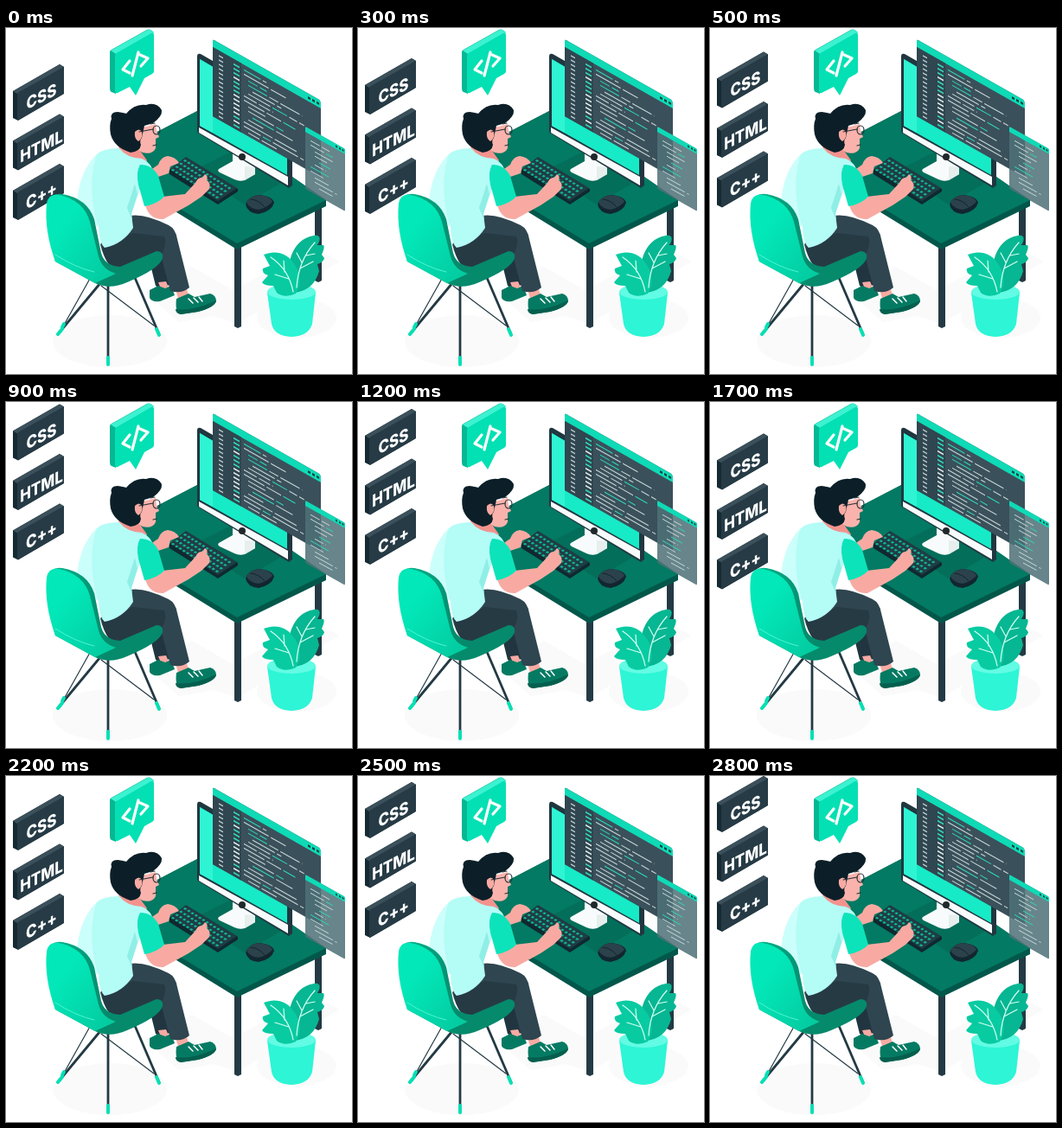
Recreate the animation shown at these times as an HTML page. Size 400 px wide and 400 px high, loop 2.9 s.

```html
<!DOCTYPE html>
<html lang="en">
<head>
<meta charset="utf-8">
<title>Coding at a desk</title>
<style>
html, body { margin: 0; width: 100%; height: 100%; overflow: hidden; background: #fff; }
svg { display: block; width: 100vw; height: 100vh; }
text { font: 800 19.5px Inter, Roboto, sans-serif; fill: #fff; text-anchor: middle; }
.line { fill: none; stroke-linecap: round; stroke-linejoin: round; }
</style>
</head>
<body>
<svg viewBox="0 0 400 400">
  <defs>
    <linearGradient id="shell" x2="1" y2="1">
      <stop offset=".3" stop-color="#02e8b9"/><stop offset="1" stop-color="#04c79d"/>
    </linearGradient>
    <linearGradient id="seat">
      <stop offset="0" stop-color="#06b98f"/><stop offset=".5" stop-color="#058a6c"/>
    </linearGradient>
  </defs>

  <g id="floor" fill="#fafafa">
    <ellipse cx="120" cy="362" rx="66" ry="30"/>
    <ellipse cx="336" cy="335" rx="46" ry="23"/>
    <path d="M160 305L215 276L262 303L357 254L385 270L268 342L240 333L200 340Z"/>
  </g>

  <g id="labels"></g>

  <g id="bubble">
    <path d="M120 28Q120 26 122 25L163 2Q165 1 167 2L171 5L127 31V76L122 74Q120 73 120 70Z" fill="#05b793"/>
    <path d="M121 26L164 2Q166 1 168 3L171 5L127 30Z" fill="#3cf2d0"/>
    <path d="M126 32Q126 30 128 29L168 6Q171 5 171 8V50Q171 52 169 53L160 58L150 78L143 68L129 75Q126 76 126 73Z" fill="#03e0b4"/>
    <path class="line" d="M143 38L135 48L143 52M155 31L164 35L156 44M153 28L146 55" stroke="#fff" stroke-width="3.2"/>
  </g>

  <g id="desk">
    <path d="M357 208h8v84l-4 2l-4-2z" fill="#233a44"/>
    <path d="M264 250h8v95l-4 2l-4-2z" fill="#233a44"/>
    <path d="M150 133L221 96L370 199V206L267 256L150 184Z" fill="#02574a"/>
    <path d="M150 133L221 96L370 199L267 249L150 178Z" fill="#037a63"/>
    <path d="M218 164L262 142L320 178L275 204Z" fill="#036e5a"/>
  </g>

  <g id="monitor">
    <path d="M246 163L262 154V136L288 150V169L276 176Q270 178 264 175L247 167Q244 165 246 163Z" fill="#f8fbfb"/>
    <path d="M276 160L288 161V169L276 176Z" fill="#e6eeee"/>
    <path d="M221 33Q221 29 225 30L331 91V182L327 185L223 122Q221 121 221 118Z" fill="#203740"/>
    <path d="M223 115L326 172V182L223 121Z" fill="#f8fbfb"/>
    <path d="M224 36L325 94V170L224 113Z" fill="#17eac6"/>
    <path d="M224 36L239 45V121L224 113Z" fill="#2ff4d4"/>
    <circle cx="273" cy="149" r="4" fill="#20282c"/>
  </g>

  <g id="keyboard">
    <path d="M189 164L208 150L268 186V189L245 204L189 169Z" fill="#0f2930"/>
    <path d="M190 163L208 149L267 185L245 200Z" fill="#1f3d44"/>
    <g id="keys"></g>
  </g>
  <g id="mouse">
    <path d="M277 204Q279 196 291 193Q308 194 310 202Q307 212 292 215Q279 214 277 204Z" fill="#12262f"/>
    <path d="M278 202Q281 195 291 193Q306 194 308 201Q301 208 292 210Q282 209 278 202Z" fill="#2b414b"/>
    <path class="line" d="M283 198Q293 199 299 207" stroke="#12262f"/>
  </g>

  <g id="editor" transform="matrix(1 .567 0 1 239 13)">
    <path d="M0 2Q0 0 2 0H122Q125 0 125 3V89H0Z" fill="#3a505a"/>
    <path d="M0 2Q0 0 2 0H122Q125 0 125 3V9H0Z" fill="#0fdab6"/>
    <path d="M0 9H33V89H0Z" fill="#304650"/>
    <path d="M110 5h3m2 0h3m2 0h3" stroke="#17453f" stroke-width="2.6"/>
  </g>
  <g id="panel" transform="matrix(1 .56 0 1 346 114)">
    <rect width="46" height="72" rx="1.5" fill="#4f7277" opacity=".86"/>
    <path d="M0 1.5Q0 0 1.5 0H44.500Q46 0 46 1.500V6H0Z" fill="#0fdab6"/>
    <path d="M35 3h2m2 0h2m1.500 0h2" stroke="#17453f" stroke-width="2"/>
  </g>

  <g id="plant">
    <path d="M302 306Q304 297 330 296Q356 297 358 306L354 342Q350 356 330 357Q310 356 307 342Z" fill="#2df5d6"/>
    <ellipse cx="330" cy="305" rx="28" ry="9" fill="#62fbe4"/>
    <path d="M328 300C323 274 330 244 356 240C361 239 364 241 362 247L360 251L367 251Q369 253 365 262L368 266Q367 271 360 273L362 281C358 296 348 305 332 306Z" fill="#07b692"/>
    <path d="M298 262C312 256 325 261 331 270C341 281 342 297 335 307Q322 313 313 306L309 298Q298 298 296 294L303 286Q295 283 297 278L305 275Z" fill="#08cba2"/>
    <path class="line" d="M336 300Q338 269 357 248M342 271L336 260M340 278L355 270M347 263L357 261M332 305Q327 279 306 265M322 282L321 269M327 290L311 285" stroke="#d3fff3" stroke-width="1.2"/>
  </g>

  <g id="person">
    <path d="M163 167L176 158Q179 149 187 148Q196 149 200 156L190 160L188 168L176 172Z" fill="#f8aaa2"/>
    <path d="M164 262L184 256L190 296L180 302L173 298Z" fill="#203540"/>
    <path d="M176 294L185 293L188 300L180 304Z" fill="#f8aaa2"/>
    <path d="M166 303L176 298L184 301L191 298L195 309L178 316Q168 317 166 312Z" fill="#057a62"/>
    <path d="M194 294L207 293L211 310L199 313Z" fill="#f8aaa2"/>
    <path d="M197 313L211 307L218 311L236 307Q243 309 243 316Q240 323 222 328L202 331Q195 329 197 313Z" fill="#057a62"/>
    <path d="M196 325Q215 328 243 315Q242 323 222 328L202 331Q196 330 196 325Z" fill="#045f4e"/>
    <path class="line" d="M211 313l5 5m1-6l5 5m1-6l4 5" stroke="#fff" stroke-width="1.5"/>
    <path d="M109 250L143 217Q160 214 188 228Q196 232 198 244L212 300Q203 308 190 304L179 263L136 284Q116 280 109 250Z" fill="#2f454f"/>
    <path d="M111 252L147 237L183 241Q187 250 179 263L136 284Q115 279 111 252Z" fill="#263a44"/>

    <path d="M130 136L153 139L163 153L153 165L133 155Z" fill="#f3938e"/>
    <path d="M105 146Q112 139 131 139Q139 150 157 151Q169 156 171 169L156 183L145 215L147 231Q135 250 114 254Q108 249 107 230Q95 218 82 205Q84 167 105 146Z" fill="#b4fcf6"/>
    <path d="M105 146Q96 173 101 205Q104 224 107 230Q95 219 82 205Q84 167 105 146Z" fill="#cbfffb"/>
    <path d="M149 180L152 192L145 215L146 222L140 208Z" fill="#8feee6"/>
    <path d="M161 205L181 195L207 192L219 179Q222 172 227 173L230 169Q234 171 232 176Q237 179 235 186L226 195L211 205L182 221Q166 222 161 205Z" fill="#f8aaa2"/>
    <path d="M155 158Q169 158 176 171L183 195Q174 204 160 206L153 181Q150 167 155 158Z" fill="#0de3ba"/>

    <path d="M147 118L173 111L174 119L177 126L173 128L173 139Q169 147 158 144L146 137Z" fill="#fab3ac"/>
    <path d="M122 105Q120 97 129 97Q136 98 139 99Q149 87 162 89Q174 85 180 95Q181 102 170 110L160 113L157 127Q154 130 156 135Q155 143 144 144Q125 138 121 123Q119 112 122 105Z" fill="#0c1f28"/>
    <path d="M149 120Q154 115 157 120Q159 127 153 131Q148 128 149 120Z" fill="#f8aaa2"/>
    <g class="line" stroke="#263238" stroke-width="1.2">
      <ellipse cx="174" cy="118" rx="4" ry="5"/>
      <path d="M154 120L170 117M167 111l5-1M170 136l4-1"/>
    </g>
  </g>

  <g id="chair">
    <g class="line" stroke="#233a44" stroke-width="2.8">
      <path d="M109 295L60 354M118 297L118 388M147 284L177 354"/>
      <path d="M98 288L66 345M110 298L171 344" stroke-width="1.2"/>
    </g>
    <path class="line" d="M65 348L60 354M118 381V389M174 348L177 355M67 342L65 346" stroke="#03e0b4" stroke-width="4"/>
    <path d="M48 203Q51 190 65 192Q94 197 102 221L110 260Q114 275 132 276L174 258Q182 258 181 266Q178 278 140 294Q120 303 103 295L57 270Q46 235 48 203Z" fill="url(#seat)"/>
    <path d="M47 203Q49 191 61 193Q90 199 97 224L107 264Q111 279 127 284L103 295L57 270Q44 234 47 203Z" fill="url(#shell)"/>
    <path class="line" d="M57 262Q80 277 102 282" stroke="#4df5d3" stroke-width="1"/>
  </g>
</svg>
<script>
const LOOP = 2900, STEP = 100;
const NS = 'http://www.w3.org/2000/svg';
// [time, drop below the highest position]
const drift = [[0, 42], [250, 37], [500, 27.5], [700, 14], [900, 2.5], [1000, 1], [1100, 3],
  [1200, 8], [1400, 19], [1700, 36.5], [1800, 39], [1900, 37], [2200, 21], [2500, 7], [2800, 0]];
const find = id => document.getElementById(id);

function add(parent, tag, attrs, label) {
  const node = document.createElementNS(NS, tag);
  for (const key in attrs) node.setAttribute(key, attrs[key]);
  if (label) node.textContent = label;
  return parent.appendChild(node);
}

let seed = 23;
function random() {
  seed = (seed * 16807) % 2147483647;
  return seed / 2147483647;
}

function dash(parent, x, y, width, color, weight) {
  add(parent, 'path', { d: `M${x} ${y}h${width}`, stroke: color, 'stroke-width': weight });
}

function codeLines(parent, x, y, right, bottom, gap, weight) {
  for (let row = 0; y < bottom; y += gap, row++) {
    let at = x + [0, 0, 5, 5, 10, 5][row % 6];
    const end = at + (right - at) * (.2 + .65 * random());
    while (at < end) {
      const width = Math.min(8 + random() * 26, end - at);
      dash(parent, at, y, width, random() < .3 ? '#2fd9bb' : '#c9d8da', weight);
      at += width + 2.5;
    }
  }
}

const editor = find('editor');
for (let y = 15; y < 86; y += 5) {
  dash(editor, 7, y, 5, '#bfd0d2', 1.4);
  dash(editor, 24, y, 7, random() < .4 ? '#35dfbd' : '#e5eeee', 1.6);
}
codeLines(editor, 36, 15, 118, 86, 5, 1.2);
codeLines(find('panel'), 6, 13, 43, 68, 5, 1);

const keys = find('keys');
for (let row = 0; row < 4; row++) {
  for (let col = 0; col < 13; col++) {
    const x = 207 - row * 4.7 + col * 4.25, y = 152 + row * 3.6 + col * 2.62;
    add(keys, 'path', { d: `M${x} ${y}l2.4 1.5l-2.2 1.5l-2.4-1.5z`, fill: '#12b394' });
  }
}

const labels = find('labels');
['CSS', 'HTML', 'C++'].forEach((name, i) => {
  const block = add(labels, 'g', { transform: `translate(0 ${i * 57.5 - 1})` });
  add(block, 'path', { d: 'M8 32L62 1L67 4V35L14 66L8 63Z', fill: '#162a33' });
  add(block, 'path', { d: 'M8 32L62 1L67 4L13 35Z', fill: '#3b505a' });
  add(block, 'path', { d: 'M13 36Q13 34 15 33L65 5Q67 4 67 6V34L65 36L15 65Q13 66 13 64Z', fill: '#263b45' });
  add(block, 'text', { transform: 'matrix(.87 -.44 0 1 41 45)' }, name);
});

function dropAt(time) {
  const next = drift.findIndex(point => point[0] > time);
  if (next < 0) return drift[drift.length - 1][1];
  const [t0, y0] = drift[next - 1], [t1, y1] = drift[next];
  return y0 + (y1 - y0) * (time - t0) / (t1 - t0);
}

const start = performance.now();
function draw(now) {
  const time = Math.floor((Math.max(0, now - start) % LOOP) / STEP) * STEP;
  labels.setAttribute('transform', `translate(0 ${dropAt(time)})`);
  requestAnimationFrame(draw);
}
draw(start);
</script>
</body>
</html>
```
